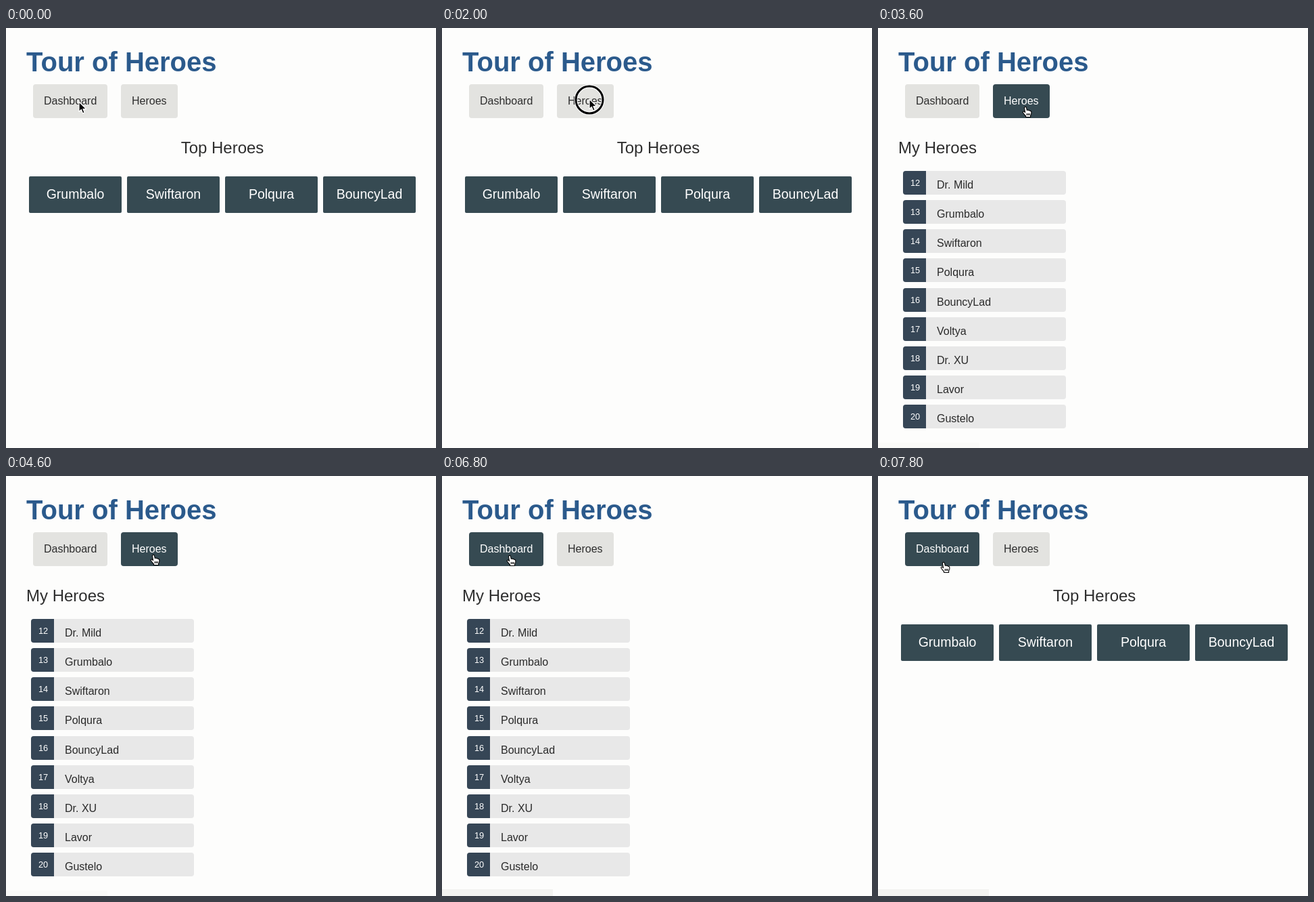
Animation, 636 px wide and 620 px high, one loop 8 s. Source, as an HTML page:

```html
<!DOCTYPE html>
<html lang="en">
<head>
<meta charset="utf-8">
<title>Tour of Heroes</title>
<style>
  html, body { margin: 0; width: 100%; height: 100%; overflow: hidden; background: #fdfdfc; }
  svg { display: block; font-family: "Liberation Sans", Arial, sans-serif; }
  .title { font-size: 40px; font-weight: bold; fill: #2b5a8c; }
  .heading { font-size: 24px; fill: #2e2e2e; }
  .tile { fill: #364a52; }
  .tile-name { font-size: 19.5px; fill: #fff; text-anchor: middle; }
  .nav rect { fill: #e3e3e0; }
  .nav text { font-size: 16px; fill: #2e2e2e; }
  .nav.hover rect { fill: #364a52; }
  .nav.hover text { fill: #fff; }
  .row { fill: #e8e8e8; }
  .badge { fill: #364656; }
  .row-id { font-size: 12.8px; fill: #fff; text-anchor: middle; }
  .row-name { font-size: 16px; fill: #2a2a2a; }
</style>
</head>
<body>
<svg id="stage" width="636" height="620" viewBox="0 0 636 620">
  <rect width="636" height="620" fill="#fdfdfc"/>
  <text class="title" x="30" y="64">Tour of Heroes</text>
  <g id="navs"></g>
  <g id="dashboard"><text class="heading" x="320" y="185" text-anchor="middle">Top Heroes</text></g>
  <g id="list"><text class="heading" x="30" y="185">My Heroes</text></g>
  <rect id="status" x="0"/>
  <g id="ring" fill="none">
    <circle stroke="#fff" stroke-width="5"/>
    <circle stroke="#000" stroke-width="3"/>
  </g>
  <g id="cursor" stroke-linejoin="round">
    <path id="arrow" d="M0 0V14.5L3.3 11.5L5.6 17L8.2 15.9L5.9 10.6H10.5Z"
      fill="#000" stroke="#fff" stroke-width="1.2"/>
    <path id="hand" d="M-1.6 1.8Q-1.4 .4 0 .4Q1.3 .4 1.6 2L2.3 5.4Q3.5 4.5 4.8 5.7Q6.1 5 7 6.5Q8.6 6.2 8.9 8.2Q9.2 11 7.6 13.2V15.5H.6V14Q-2 11.5-3.8 8.5Q-3.9 6.8-2.1 7.2L-.4 8.7Z
      M2.3 10V13M4.3 10V13M6.2 10V13" fill="#fff" stroke="#000" stroke-width="1.1"/>
  </g>
</svg>
<script>
const DURATION = 8000, STEP = 200;
const heroes = ["Dr. Mild", "Grumbalo", "Swiftaron", "Polqura", "BouncyLad", "Voltya", "Dr. XU", "Lavor", "Gustelo"];
const navs = [
  { label: "Dashboard", x: 40, width: 110 },
  { label: "Heroes", x: 170, width: 84 }
];

// time, x, y of the pointer's hot spot
const path = [
  [0, 108, 109], [600, 108, 109], [1600, 218, 105], [2200, 218, 105], [2600, 218, 116],
  [4600, 218, 116], [5600, 126, 116], [6200, 126, 116], [6600, 100, 117], [7200, 100, 117],
  [7600, 97, 127], [8000, 97, 127]
];
// click rings: time, centre y, radius
const rings = [[2000, 106, 20], [2200, 106, 29.5], [3200, 116, 20], [3400, 116, 29.5], [7000, 117, 26]];
const HOVER_FROM = 2400, LIST_FROM = 3600, LIST_TO = 7200;
const STATUS_FROM = 2600, STATUS_WIDE_FROM = 5400;

const $ = id => document.getElementById(id);

function add(parent, tag, attrs, text = "") {
  const node = document.createElementNS("http://www.w3.org/2000/svg", tag);
  set(node, attrs);
  node.textContent = text;
  return parent.appendChild(node);
}
function set(node, attrs) {
  for (const key in attrs) node.setAttribute(key, attrs[key]);
}
const show = (node, on) => { node.style.display = on ? "" : "none"; };

for (const nav of navs) {
  nav.node = add($("navs"), "g", { class: "nav" });
  add(nav.node, "rect", { x: nav.x, y: 83, width: nav.width, height: 50, rx: 4 });
  add(nav.node, "text", { x: nav.x + 16, y: 113 }, nav.label);
}

heroes.slice(1, 5).forEach((name, i) => {
  const x = 34 + 145 * i;
  add($("dashboard"), "rect", { class: "tile", x, y: 219, width: 137, height: 54, rx: 2 });
  add($("dashboard"), "text", { class: "tile-name", x: x + 68.5, y: 252 }, name);
});

heroes.forEach((name, i) => {
  const y = Math.round(211 + 43.125 * i), list = $("list");
  add(list, "rect", { class: "row", x: 37, y, width: 241, height: 35, rx: 4 });
  add(list, "path", { class: "badge", d: `M71 ${y}v35H41q-4 0-4-4v-27q0-4 4-4z` });
  add(list, "text", { class: "row-id", x: 55, y: y + 22 }, 12 + i);
  add(list, "text", { class: "row-name", x: 87, y: y + 26 }, name);
});

function pointerAt(t) {
  const next = path.findIndex(p => p[0] > t);
  const [t0, x0, y0] = path[next - 1], [t1, x1, y1] = path[next];
  const k = (t - t0) / (t1 - t0), eased = k * k * (3 - 2 * k);
  return [x0 + (x1 - x0) * eased, y0 + (y1 - y0) * eased];
}

function draw(t) {
  const [x, y] = pointerAt(t);
  let hovering = false;
  for (const { node, x: left, width } of navs) {
    const over = t >= HOVER_FROM && x >= left && x < left + width;
    node.classList.toggle("hover", over);
    hovering = hovering || over;
  }

  $("cursor").setAttribute("transform", `translate(${x} ${y})`);
  show($("arrow"), !hovering);
  show($("hand"), hovering);

  const listed = t >= LIST_FROM && t < LIST_TO;
  show($("list"), listed);
  show($("dashboard"), !listed);

  const wide = t >= STATUS_WIDE_FROM;
  show($("status"), t >= STATUS_FROM);
  set($("status"), wide
    ? { y: 610, width: 164, height: 10, fill: "#f3f3f0" }
    : { y: 612, width: 150, height: 8, fill: "#fafaf8" });

  const ring = rings.find(r => r[0] === t);
  show($("ring"), ring);
  if (ring) for (const c of $("ring").children) set(c, { cx: x, cy: ring[1], r: ring[2] });
}

const start = performance.now();
function tick() {
  const t = (performance.now() - start) % DURATION;
  draw(Math.floor(t / STEP) * STEP);
  requestAnimationFrame(tick);
}
tick();
</script>
</body>
</html>
```
